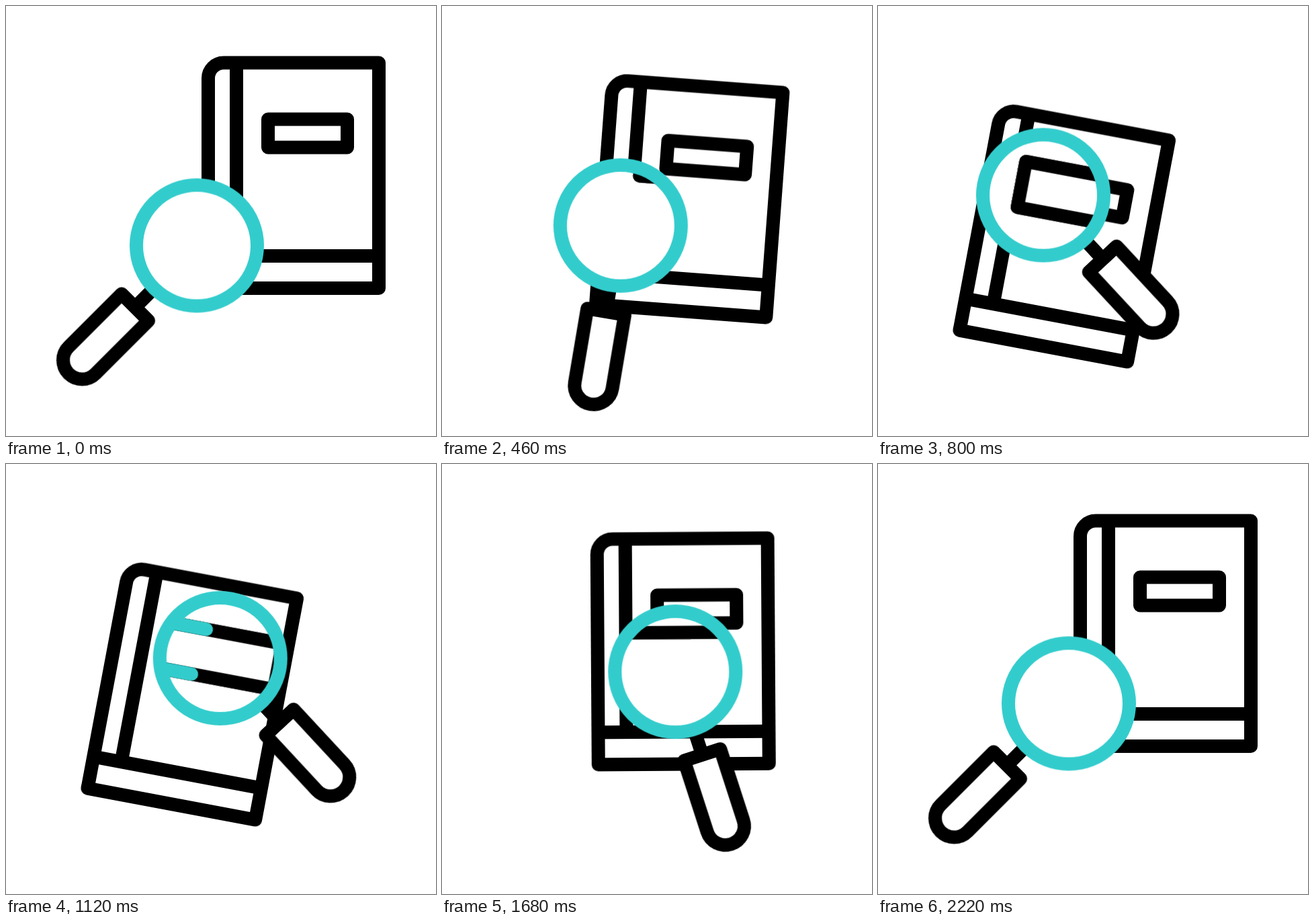
An HTML page for the animation above (2400 ms loop, 640 by 640 pixels).

```html
<!DOCTYPE html>
<html lang="en">
<head>
<meta charset="utf-8">
<title>Book search</title>
<style>
  @property --from { syntax: "<length>"; inherits: false; initial-value: 0px; }
  @property --to { syntax: "<length>"; inherits: false; initial-value: 0px; }

  html, body { margin: 0; width: 100%; height: 100%; overflow: hidden; background: #fff; }
  svg {
    display: block; width: 100%; height: 100%;
    fill: none; stroke: #000; stroke-width: 20; stroke-linejoin: round;
    --ease: cubic-bezier(.333, 0, .667, 1);
  }
  .disc { fill: #fff; stroke: none; }
  .grip { fill: #fff; }
  .ring, .trace { stroke: #3cc; }

  .book {
    transform-origin: 428px 252px;
    animation: book 2.4s var(--ease) infinite, drift 2.4s var(--ease) infinite;
  }
  .lens { animation: sweep 2.4s var(--ease) infinite, bow 2.4s var(--ease) infinite; }
  .handle { animation: swing 2.4s var(--ease) infinite; }
  .trace {
    stroke-linecap: round;
    stroke-dasharray: calc(var(--to) - var(--from)) 2000px;
    stroke-dashoffset: calc(-1 * var(--from));
    animation: tail 2.4s var(--ease) infinite, head 2.4s var(--ease) infinite,
               show 2.4s step-end infinite;
  }

  @keyframes book {
    0%, 8.333%, 91.667%, 100% { transform: translate(0px, 0px) rotate(0deg); }
    33.333%, 58.333% { transform: translate(-150.7px, 89.1px) rotate(10.65deg); }
    79.167% { transform: translate(-21.4px, -14px) rotate(-7.95deg); }
  }
  /* bend of the book path */
  @keyframes drift {
    0%, 8.333%, 33.333%, 58.333%, 79.167%, 100% { translate: 0px 0px; }
    20.833% { translate: 1px -1.6px; }
    68.75% { translate: 5px -1.5px; }
  }
  @keyframes sweep {
    0%, 8.333%, 91.667%, 100% { translate: 284px 356.5px; }
    33.333% { translate: 246px 281.5px; }
    58.333% { translate: 377.8px 295.3px; }
  }
  /* bend of the lens path */
  @keyframes bow {
    0%, 8.333%, 33.333%, 58.333%, 91.667%, 100% { transform: translate(0px, 0px); }
    20.833% { transform: translate(-3px, .5px); }
    75% { transform: translate(-5px, -4.4px); }
  }
  @keyframes swing {
    0%, 8.333%, 91.667%, 100% { transform: rotate(45deg); }
    33.333%, 58.333% { transform: rotate(-42.85deg); }
  }
  @keyframes head {
    0%, 29.167% { --to: 0px; }
    58.333%, 100% { --to: 528.4px; }
  }
  @keyframes tail {
    0%, 37.5% { --from: 0px; }
    66.667%, 100% { --from: 528.4px; }
  }
  @keyframes show {
    0%, 66.667%, 100% { opacity: 0; }
    29.167% { opacity: 1; }
  }
</style>
</head>
<body>
<svg viewBox="0 0 640 640">
  <clipPath id="glass"><circle class="lens" r="90"/></clipPath>

  <g class="book">
    <path d="M301 420V107.5a23 23 0 0 1 23-23H555V420ZM343 84.5V372M301 372H555"/>
    <rect x="390" y="168.5" width="118" height="42"/>
  </g>

  <g class="lens">
    <g class="handle">
      <path d="M0 95V130"/>
      <path class="grip" d="M-28.3 130H28.3V241.4A28.3 28.3 0 0 1-28.3 241.4Z"/>
    </g>
    <circle class="disc" r="90"/>
  </g>

  <!-- enlarged label, seen only through the glass -->
  <g clip-path="url(#glass)">
    <g class="book">
      <rect x="351.6" y="154.8" width="194.8" height="69.4"/>
      <path class="trace" d="M546.4 224.2H351.6V154.8H546.4V224.2"/>
    </g>
  </g>

  <g class="lens"><circle class="ring" r="90"/></g>
</svg>
</body>
</html>
```
